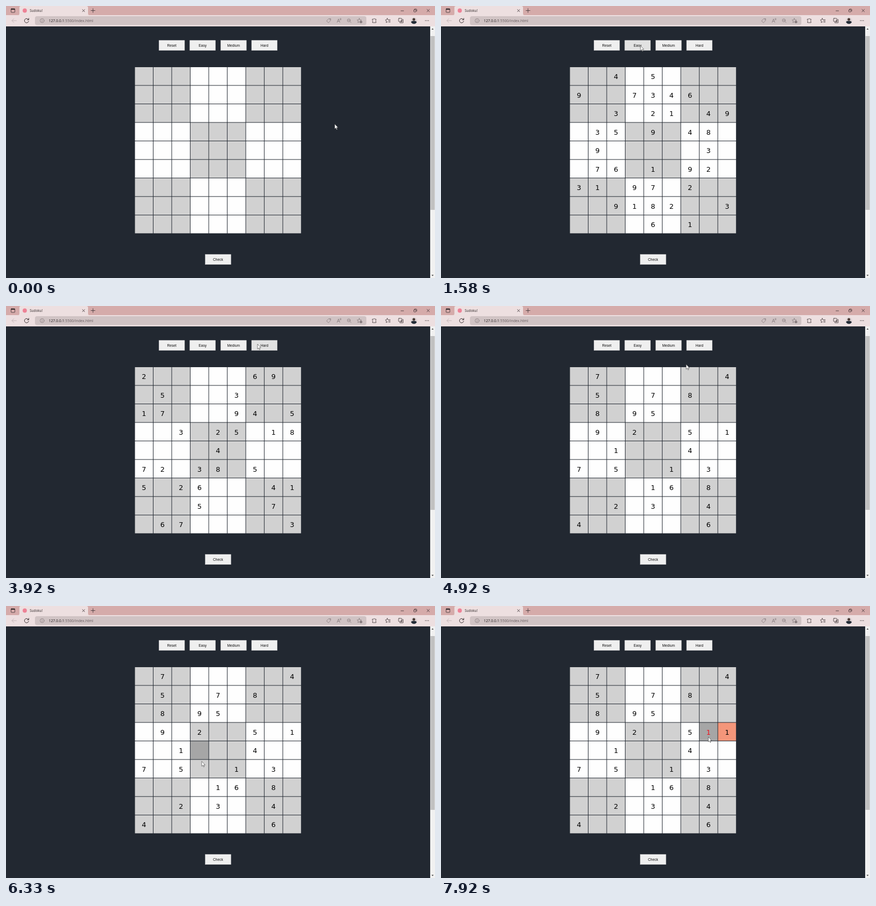
Animation of 800 by 507 pixels, one loop 8 s. Source, as an HTML page:

```html
<!DOCTYPE html>
<html lang="en">
<head>
<meta charset="utf-8">
<title>Sudoku!</title>
<style>
html, body { margin: 0; width: 100%; height: 100%; overflow: hidden; background: #222831; }
svg { display: block; width: 800px; height: 507px; }
.ui { font-family: "Open Sans", "Noto Sans", sans-serif; }
.btn { font: 6.67px "Liberation Sans", Arial, sans-serif; text-anchor: middle; fill: #111; }
.digit { font: 12.8px "DejaVu Sans", Verdana, sans-serif; text-anchor: middle; }
.icon { fill: none; stroke: #382e30; stroke-width: .8; stroke-linecap: round; stroke-linejoin: round; }
.soft { stroke: #85797b; }
</style>
</head>
<body>
<svg id="stage" viewBox="0 0 800 507" xmlns="http://www.w3.org/2000/svg">
  <rect width="800" height="507" fill="#222831"/>

  <rect width="800" height="18" fill="#d5abaa"/>
  <rect y="17" width="800" height="21" fill="#eddfe0"/>
  <path d="M23 17.5Q25 17 25 14V3Q25 0 28 0H150Q153 0 153 3V14Q153 17 156 17.5Z" fill="#eddfe0"/>
  <circle cx="35" cy="8.5" r="3.9" fill="#ee8296"/>
  <text class="ui" x="44.3" y="10.8" font-size="6.3" fill="#2c2526">Sudoku!</text>
  <rect x="54" y="19" width="618" height="16.5" rx="4" fill="#d0c3c4"/>
  <text class="ui" x="79.8" y="29.9" font-size="6.85" fill="#1c1719">127.0.0.1<tspan fill="#665b5d">:5500/index.html</tspan></text>

  <g class="icon">
    <rect x="9.5" y="5" width="7" height="7" rx="1"/>
    <path d="M10 6H16" stroke-width="2"/>
    <path d="M142.5 6.5L146.700 10.700M146.700 6.500L142.500 10.700M158.500 8.500H166M162.200 4.800V12.200"/>
    <path d="M736.500 9H741.500M785 6.200L789.600 10.800M789.600 6.200L785 10.800"/>
    <rect x="760.500" y="7" width="4" height="4" rx=".8"/>
    <path d="M762 5.700H764.800Q766 5.700 766 7V9.700"/>
    <path d="M19.500 27.300H11M14.500 23.700L11 27.300L14.500 30.900" stroke="#bdaeb0"/>
    <path d="M42 25.500A4 4 0 1 0 42.300 28.500M42.500 23V25.800H39.700" stroke-width="1"/>
    <g class="soft">
      <circle cx="67.300" cy="27.300" r="3.700"/>
      <path d="M67.300 27V29.200M67.300 25.300V25.400"/>
      <path d="M598 27.500L602 23.500H605.500V27L601.500 31Z"/>
      <circle cx="603.700" cy="25.300" r=".3"/>
      <path d="M617.500 30.500L620 24L622.500 30.500M618.300 28.500H621.700M623 23.500Q624 24.500 623 25.700M624.200 22.800Q625.700 24.500 624.200 26.300"/>
      <circle cx="639.300" cy="26.700" r="2.800"/>
      <path d="M638 26.700H640.600M641.400 28.800L643.500 31"/>
      <path id="star" d="M658.800 23L660 25.800L663 26.100L660.800 28.100L661.300 31L658.800 29.500L656.200 31L656.800 28.100L654.700 26.100L657.600 25.800Z"/>
      <circle cx="662" cy="29.800" r="2" fill="#85797b"/>
    </g>
    <path d="M683.500 24.500H685.500A1.300 1.300 0 0 1 688 24.500H690V26.700A1.300 1.300 0 0 0 690 29V31H683.500V29A1.300 1.300 0 0 0 683.500 26.700Z"/>
    <path d="M711 23L712.200 25.600H716.500M713.500 27.800H716.500M713.500 30H716.500M711 23L709.800 25.600L707.500 26L709.300 28L709 31L711.500 29.500"/>
    <rect x="732" y="23" width="6" height="6" rx="1"/>
    <path d="M739.500 25H740.500V31.300H734.500V30.500M737.500 26.500V30M735.800 28.200H739.200"/>
  </g>
  <g>
    <circle cx="760.700" cy="27.300" r="6" fill="#ddd3d4"/>
    <circle cx="760.600" cy="24.900" r="2.500" fill="#4b3934"/>
    <path d="M755.300 30.200Q756 27.800 760.600 27.800T766 30.200Q764.200 33.300 760.700 33.300T755.300 30.200Z" fill="#232b36"/>
  </g>
  <g fill="#382e30"><circle cx="782.200" cy="27.300" r=".7"/><circle cx="785" cy="27.300" r=".7"/><circle cx="787.800" cy="27.300" r=".7"/></g>

  <rect x="791" y="38" width="9" height="469" fill="#f1f1f1"/>
  <rect x="791.500" y="56" width="8" height="324" fill="#c1c1c1"/>
  <path d="M793.500 44L795.500 41.500L797.500 44ZM793.500 501L795.500 503.500L797.500 501Z" fill="#505050"/>

  <g id="buttons"></g>
  <g id="board"></g>
  <path id="cursor" d="M0 0V9.200L2.100 7.300L3.500 10.500L4.900 9.900L3.500 6.800H6.300Z" fill="#fff" stroke="#333" stroke-width=".6" stroke-linejoin="round"/>
</svg>
<script>
const LOOP = 8000, TICK = 1000 / 12;
const PITCH = 34.52, LEFT = 240.5, TOP = 114;
const $ = id => document.getElementById(id);

function add(parent, tag, attrs, text) {
  const el = document.createElementNS("http://www.w3.org/2000/svg", tag);
  for (const k in attrs) el.setAttribute(k, attrs[k]);
  if (text) el.textContent = text;
  return parent.appendChild(el);
}

// Each puzzle: the tick it appears at, and its nine rows
const puzzles = [
  [0, ".".repeat(81)],
  [17, "..4.5.... 9..7346.. ..3.21.49 .35.9.48. .9.....3. .76.1.92. 31.97.2.. ..9182..3 ....6.1.."],
  [38, "2.....69. .5...3... 17...94.5 ..3.25.18 ....4.... 72.38.5.. 5.26...41 ...5...7. .67.....3"],
  [50, ".7......4 .5..7.8.. .8.95.... .9.2..5.1 ..1...4.. 7.5..1.3. ....16.8. ..2.3..4. 4......6."]
].map(([at, rows]) => [at, rows.replace(/ /g, "")]);

// Selected cell index from a tick on
const picks = [[0, -1], [64, 2 * 9 + 5], [75, 4 * 9 + 3], [81, 3 * 9 + 7]];
const TYPED_AT = 92, TYPED = 3 * 9 + 7, CLASH = 3 * 9 + 8;

// Pointer path: tick, x, y
const path = [
  [2, 613, 220], [13, 376, 77], [18, 372, 74], [25, 372, 74], [29, 420, 74],
  [40, 420, 74], [46, 469, 71], [56, 469, 71], [64, 431.5, 190], [68, 431.5, 190],
  [74, 361, 268], [76, 365, 289.5], [81, 497, 242], [82, 497.5, 247], [86, 498.5, 244]
];

const buttons = [["Reset", 285.2, 64], ["Easy", 342.8, 64], ["Medium", 400.4, 64], ["Hard", 458, 64], ["Check", 371.6, 463]]
  .map(([label, x, y]) => {
    const box = add($("buttons"), "rect", { x, y, width: 47.8, height: 18.8, stroke: "#dcdcdc", "stroke-width": .5 });
    add($("buttons"), "text", { class: "btn", x: x + 23.9, y: y + 11.6 }, label);
    return { box, x, y };
  });

const cells = Array.from({ length: 81 }, (_, i) => {
  const r = Math.floor(i / 9), c = i % 9;
  const x = LEFT + c * PITCH, y = TOP + r * PITCH;
  const shaded = (Math.floor(r / 3) + Math.floor(c / 3)) % 2 === 0;
  return {
    box: add($("board"), "rect", { x, y, width: PITCH - 1, height: PITCH - 1 }),
    text: add($("board"), "text", { class: "digit", x: x + 16.8, y: y + 22 }),
    base: shaded ? "#d1d1d1" : "#fefefe"
  };
});

const current = (list, n) => list.filter(e => e[0] <= n).pop()[1];

function pointer(n) {
  const i = path.findIndex(p => p[0] > n);
  if (i === 0) return path[0].slice(1);
  if (i < 0) return path[path.length - 1].slice(1);
  const a = path[i - 1], b = path[i];
  const u = (n - a[0]) / (b[0] - a[0]), k = u * u * (3 - 2 * u);
  return [a[1] + (b[1] - a[1]) * k, a[2] + (b[2] - a[2]) * k];
}

function draw(ms) {
  const n = Math.floor((ms % LOOP + 4) / TICK) % 96;
  const [px, py] = pointer(n);
  $("cursor").setAttribute("transform", `translate(${px} ${py})`);

  for (const b of buttons) {
    const over = px >= b.x && px < b.x + 48 && py >= b.y && py < b.y + 19;
    b.box.setAttribute("fill", over ? "#e2e2e2" : "#efefef");
  }

  const grid = current(puzzles, n), pick = current(picks, n), typed = n >= TYPED_AT;
  cells.forEach((cell, i) => {
    const mine = typed && i === TYPED;
    const ch = mine ? "1" : grid[i] === "." ? "" : grid[i];
    if (cell.text.textContent !== ch) cell.text.textContent = ch;
    cell.text.setAttribute("fill", mine ? "#f0101c" : "#000");
    cell.box.setAttribute("fill", typed && i === CLASH ? "#f4967a" : i === pick ? "#a6a6a6" : cell.base);
  });
}

const start = performance.now();
function frame() {
  draw(performance.now() - start);
  requestAnimationFrame(frame);
}
frame();
</script>
</body>
</html>
```
